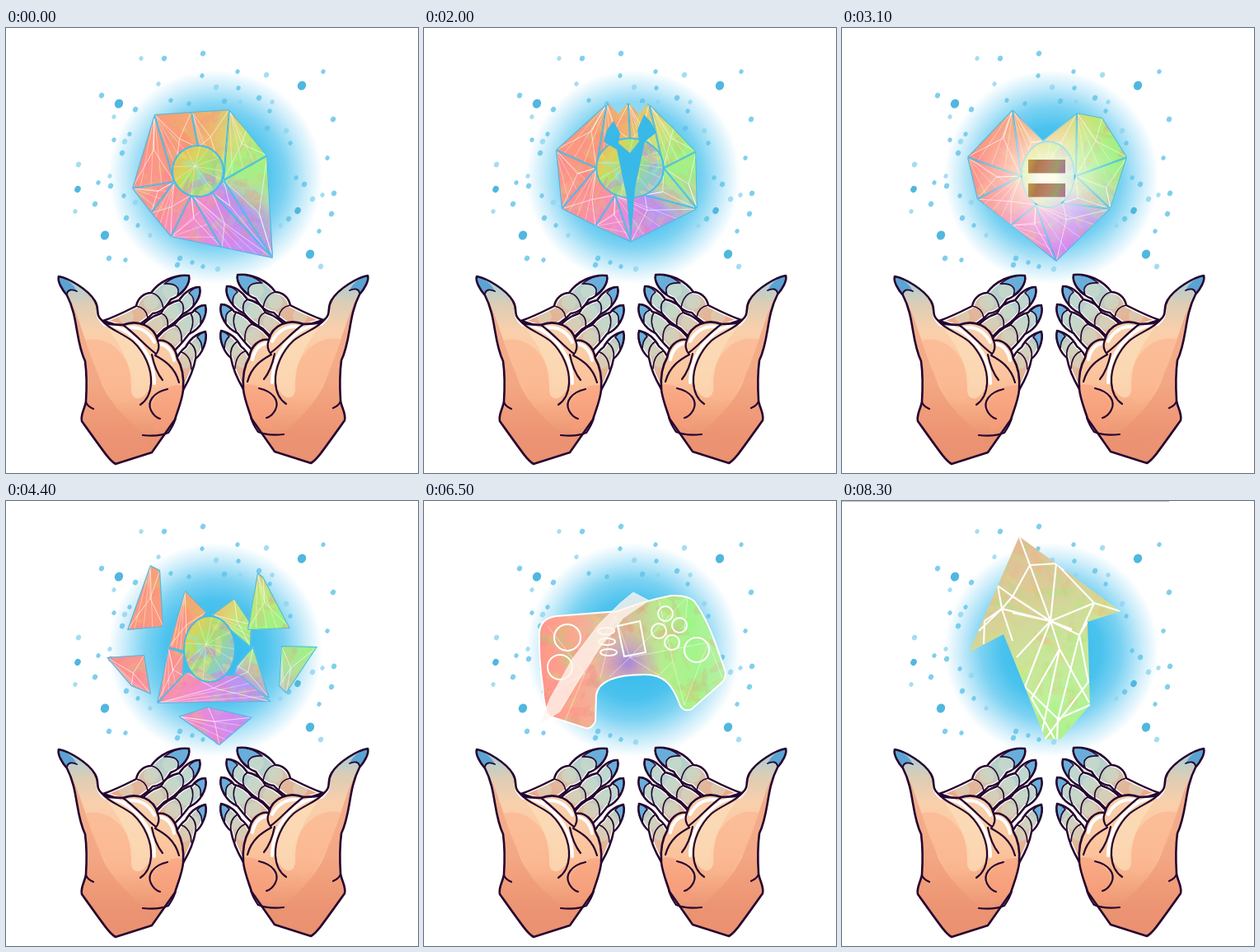
These frames come from a looping animation (500x541 px, 9.4 s). An HTML page with a canvas:

```html
<!DOCTYPE html>
<html lang="en">
<head>
<meta charset="utf-8">
<title>Crystal between two hands</title>
<style>
html, body { margin: 0; width: 100%; height: 100%; overflow: hidden; background: #fff; }
canvas { display: block; width: 500px; height: 541px; }
</style>
</head>
<body>
<canvas id="stage" width="500" height="541"></canvas>
<script>
const W = 500, H = 541, LOOP = 9400, INK = '#26042f', BLUE = '#42bde9';
const ctx = document.getElementById('stage').getContext('2d');
const nums = text => text.trim().split(/\s+/).map(Number);
const pairs = text => {
  const n = nums(text), out = [];
  for (let i = 0; i < n.length; i += 2) out.push([n[i], n[i + 1]]);
  return out;
};
const mix = (a, b, p) => a + (b - a) * p;
const clamp = v => Math.max(0, Math.min(1, v));
const mixPts = (a, b, p) => a.map((v, i) => [mix(v[0], b[i][0], p), mix(v[1], b[i][1], p)]);

let seed = 7;
const rnd = () => (seed = seed * 16807 % 2147483647) / 2147483647;

function layer(draw) {
  const c = document.createElement('canvas');
  c.width = W; c.height = H;
  draw(c.getContext('2d'));
  return c;
}
function stops(grad, colors) {
  colors.forEach((c, i) => grad.addColorStop(i / (colors.length - 1), c));
  return grad;
}
const linear = (g, x0, y0, x1, y1, colors) => stops(g.createLinearGradient(x0, y0, x1, y1), colors);
function poly(pts) {
  const p = new Path2D();
  pts.forEach(v => p.lineTo(...v));
  p.closePath();
  return p;
}

// ---- static scene: glow, dots, hands ----
const dots = pairs(`164 37 239 31 281 53 316 57 385 53 116 82 185 68 192 37 238 58 255 72
  282 73 307 85 323 90 397 111 390 158 88 166 112 188 108 214 84 223 125 280 145 282 382 290
  380 247 398 201 384 203 395 226 239 290 257 293 226 285 208 288 131 108 157 99 150 129 144 138
  131 136 141 152 126 180 127 192 143 204 157 212 160 240 146 231 175 252 211 280 200 88 208 103
  222 92 265 89 284 90 317 122 320 101 340 125 345 140 343 232 333 240 362 190 352 182 372 208`);
const bigDots = pairs('137 92 359 70 120 252 369 275 354 222 87 196');

const fingers = [
  ['M118 356C135 350 150 342 158 338C160 328 168 322 176 322C186 308 205 299 222 301C224 310 216 324 200 330C194 340 188 346 178 347C170 356 160 362 150 366Z',
   'M192 311C203 302 214 300 222 301C224 308 218 318 208 325C212 315 205 310 192 311Z', 'M158 338Q170 340 172 352M176 322Q188 324 191 341'],
  ['M158 370C168 356 178 350 188 347C192 338 200 333 210 331C216 322 226 314 235 315C238 326 228 342 214 348C208 356 200 362 192 366L178 380Z',
   'M222 322C227 316 232 315 235 315C237 323 234 331 227 338C229 330 227 326 222 322Z', 'M188 347Q198 350 196 364M210 331Q218 336 214 348'],
  ['M178 384C186 372 194 364 204 361C210 352 220 347 226 346C230 340 236 337 242 337C245 350 236 366 222 372C216 380 210 388 200 396Z',
   'M229 344C235 337 240 337 242 337C244 344 242 352 236 359C237 350 235 346 229 344Z', 'M204 361Q214 364 213 382M224 347Q230 356 223 371'],
  ['M204 408C208 398 212 392 218 388C222 380 230 372 242 369C245 380 238 396 230 402C228 414 222 428 215 440L204 430Z',
   'M232 376C236 371 240 369 242 369C244 376 242 384 238 392C238 384 236 379 232 376Z', 'M213 394Q224 398 225 415M222 382Q232 388 230 402']
];
const pads = pairs('146 351 176 334 199 320 182 359 202 345 220 331 202 376 218 361 231 351 216 405 226 391');
const palm = 'M64 302C76 304 100 318 108 332C114 342 108 348 116 355C122 362 130 360 142 361C160 354 180 362 184 380C196 378 206 388 208 402C214 412 216 426 215 440C214 452 208 466 205 476L177 516L133 530C126 526 122 520 92 478C90 470 96 462 97 454C98 438 98 420 96 405C84 380 88 352 74 325C68 318 62 308 64 302Z';

function hand(g) {
  const fill = (d, c) => { g.fillStyle = c; g.fill(new Path2D(d)); };
  const line = (d, c = INK, w = 2.2) => { g.strokeStyle = c; g.lineWidth = w; g.stroke(new Path2D(d)); };
  g.lineCap = g.lineJoin = 'round';
  for (const [shape, nail, joints] of fingers) {
    fill(shape, linear(g, 225, 320, 150, 385, ['#a5cfdb', '#b9d0c8', '#e3b699', '#f0a685']));
    g.save();
    g.clip(new Path2D(shape));
    g.fillStyle = '#d3dfc980';
    pads.forEach(([x, y]) => { g.beginPath(); g.arc(x, y, 9, 0, 7); g.fill(); });
    line(shape, '#fff', 5);
    g.restore();
    line(joints, INK, 1.6);
    fill(nail, '#69aeda');
    line(nail, INK, 1.6);
    line(shape, INK, 2.5);
  }
  fill(palm, linear(g, 150, 303, 150, 530, ['#9fcfe0', '#dccdb5', '#f9cfac', '#fbcba4', '#fbc19a', '#f5a982', '#ea9472', '#e68f6d']));
  g.save();
  g.clip(new Path2D(palm));
  fill('M74 325C88 345 96 385 112 420C120 450 140 470 168 494L180 520L130 535L85 478L97 440Z', '#ee937390');
  fill('M96 380C126 372 150 400 156 430C158 460 138 462 122 440C108 420 104 400 96 380Z', '#fcb58ea0');
  fill('M124 366C156 370 178 400 175 436C164 458 150 452 152 436C152 408 140 388 124 366Z', '#fde0bbb0');
  fill('M178 455C186 440 204 430 216 436L205 478L180 490Z', '#fa9c7b90');
  line('M112 343Q110 352 120 361C150 362 180 394 180 432M144 365Q168 360 180 382M186 384Q200 386 204 404', '#fff', 4);
  g.restore();
  line('M116 355C124 366 140 370 154 381C168 394 177 414 176 432Q175 450 163 458M142 361C160 374 170 388 182 396M184 380Q188 390 181 398C192 404 205 412 210 431M177 397Q181 417 190 428M196 439C178 443 171 455 176 465Q180 473 187 475M166 495Q186 497 197 492Q204 482 206 474M97 455Q99 460 106 463');
  fill('M64 302C70 303 82 310 86 320C80 318 76 318 74 323C67 314 62 306 64 302Z', '#5ba3d2');
  line('M86 320C80 317 75 318 74 323', INK, 1.8);
  line(palm, INK, 2.6);
}

const scene = layer(g => {
  g.fillStyle = '#fff';
  g.fillRect(0, 0, W, H);
  const glow = g.createRadialGradient(254, 181, 30, 254, 181, 130);
  [[0, '#3bbdec'], [.3, '#4ac2ee'], [.55, '#7bd2f2'], [.8, '#c9ecfa'], [1, '#ffffff']].forEach(s => glow.addColorStop(...s));
  g.fillStyle = glow;
  g.fillRect(120, 48, 268, 268);
  const dot = (x, y, r) => { g.beginPath(); g.ellipse(x, y, r, r * 1.15, .5, 0, 7); g.fill(); };
  dots.forEach(([x, y], i) => { g.fillStyle = i % 3 ? '#5fc3e8cc' : '#8ed4efcc'; dot(x, y, 2.5 + i % 2 * .5); });
  g.fillStyle = '#50b7de';
  bigDots.forEach(([x, y], i) => dot(x, y, i < 4 ? 5 : 3.6));
  hand(g);
  g.setTransform(-1, 0, 0, 1, 503, -1);
  hand(g);
});

// ---- holographic textures ----
function texture(makeBase, hues, strength) {
  return ctx.createPattern(layer(g => {
    g.fillStyle = makeBase(g);
    g.fillRect(0, 0, W, H);
    for (let i = 0; i < 500; i++) {
      const x = 120 + rnd() * 270, y = 40 + rnd() * 265, hue = hues[i % hues.length];
      g.fillStyle = `hsla(${hue},90%,70%,${strength})`;
      g.beginPath();
      g.ellipse(x, y, 3 + rnd() * 12, 2 + rnd() * 4, rnd() * 6, 0, 7);
      g.fill();
    }
  }), 'no-repeat');
}
const rainbow = texture(g => {
  const c = g.createConicGradient(0, 250, 180);
  [[0, '#a0f08c'], [.07, '#b5d8b0'], [.13, '#b596f5'], [.22, '#d48bf0'], [.3, '#f08cd0'], [.38, '#fb90a8'],
   [.5, '#fd9488'], [.62, '#fa9a7c'], [.74, '#efb36d'], [.84, '#d2df78'], [.92, '#a6f080'], [1, '#a0f08c']].forEach(s => c.addColorStop(...s));
  return c;
}, [10, 45, 95, 330, 20], .13);
const orbFill = texture(g => linear(g, 205, 145, 285, 205, ['#f0ae68', '#d9d45c', '#a9d87c', '#8ccfc0', '#c9a3d8']), [55, 180, 100, 30, 290], .3);
const padFill = texture(g => linear(g, 140, 190, 366, 175, ['#ff958c', '#fca58f', '#edb79f', '#d5c19c', '#b6ee90', '#a3f58d', '#b9efaa']), [5, 30, 110, 80, 350], .13);
const mintFill = texture(g => linear(g, 255, 280, 365, 150, ['#d5e98c', '#a6f4df', '#a8f3f3']), [170, 185, 150, 90], .22);
const arrowFill = texture(g => linear(g, 180, 60, 280, 290, ['#e2bd9b', '#dacb98', '#cee09a', '#bdf09b', '#a8f58e']), [40, 80, 110, 25], .14);

// ---- faceted shapes: ten quads sharing fifteen vertices ----
const facets = ['0 0 10 9', '9 10 10 8', '10 12 7 8', '0 1 14 10', '1 2 11 14', '2 3 4 11', '11 4 5 5', '11 5 13 13', '12 13 5 6', '7 12 12 6'].map(nums);
const shape = (text, orb) => {
  const v = pairs(text);
  return { quads: facets.map(f => f.map(i => v[i])), orb };
};
const gem = shape('180 105 225 102 271 99 292 124 317 155 324 280 262 267 200 254 176 225 153 195 204 187 264 185 225 203 250 200 233 145', [233, 174, 31, 31]);
const hex = shape('222 92 248 91 273 92 303 122 330 150 332 220 251 260 208 241 167 220 160 148 209 170 291 170 232 203 268 203 250 136', [250, 170, 41, 36]);
const heart = shape('207 99 244 137 285 103 316 109 346 157 326 220 260 284 205 240 164 208 152 157 217 180 284 180 235 215 268 213 250 139', [250, 178, 32, 40]);
const burst = {
  quads: ['175 78 187 84 191 153 147 157', '122 190 168 187 176 235 152 225', '197 178 216 185 215 212 183 246',
    '217 108 243 135 218 183 197 178', '250 138 277 118 298 150 297 178', '305 87 312 92 345 155 293 157',
    '334 176 378 177 340 234 331 225', '300 177 320 240 275 215 280 200', '209 262 245 250 299 263 259 297',
    '183 246 218 208 285 212 322 244'].map(pairs),
  orb: [247, 180, 31, 40]
};
const fused = { quads: burst.quads.map(q => q.map(([x, y]) => [mix(250, x, .7), mix(185, y, .5)])), orb: [250, 185, 25, 28] };
const morph = (a, b, p) => ({
  quads: a.quads.map((q, i) => mixPts(q, b.quads[i], p)),
  orb: a.orb.map((v, i) => mix(v, b.orb[i], p))
});

function clipped(path, draw) {
  ctx.save();
  ctx.clip(path);
  draw();
  ctx.restore();
}
function stroke(path, color, width) {
  ctx.strokeStyle = color;
  ctx.lineWidth = width;
  ctx.stroke(path);
}
function rays(from, targets) {
  const p = new Path2D();
  targets.forEach(v => { p.moveTo(...from); p.lineTo(...v); });
  return p;
}
function drawCrystal({ quads, orb }) {
  for (const q of quads) {
    const path = poly(q), [a, b, c, d] = q;
    ctx.fillStyle = rainbow;
    ctx.fill(path);
    clipped(path, () => {
      const hub = [0, 1].map(k => (a[k] + b[k] + c[k] + d[k]) / 4);
      stroke(rays(hub, q), '#ffffffb0', .9);
      stroke(rays(a, [.3, .55, .8].map(p => mixPts([c], [d], p)[0])), '#ffffff90', .7);
      stroke(path, BLUE, 2.2);
    });
  }
  const [x, y, rx, ry] = orb, ball = new Path2D();
  ball.ellipse(x, y, rx, ry, 0, 0, 7);
  ctx.fillStyle = orbFill;
  ctx.fill(ball);
  clipped(ball, () => {
    const rim = Array.from({ length: 11 }, (_, i) => [x + rx * Math.cos(i * 2.4), y + ry * Math.sin(i * 2.4)]);
    stroke(rays([x - 4, y - 6], rim), '#ffffff80', .7);
  });
  stroke(ball, BLUE, 2);
}

const spike = new Path2D('M218 138L222 124L230 113L238 128L236 140L250 152L261 138L259 124L267 105L275 114L282 127L268 138L256 195L251 260L246 205L234 148Z');
const teeth = new Path2D('M223 91L236 105L247 91ZM249 91L261 105L272 91Z');

function drawEquals(alpha) {
  ctx.globalAlpha = alpha;
  const g = ctx.createRadialGradient(249, 182, 8, 249, 182, 90);
  stops(g, ['#fffef0f5', '#fffde8a0', '#ffffff40', '#ffffff00']);
  ctx.fillStyle = g;
  clipped(heartOutline, () => ctx.fillRect(140, 90, 220, 200));
  for (const y of [160, 189]) {
    ctx.fillStyle = linear(ctx, 226, y, 271, y + 16, ['#bd9e45', '#b0784f', '#b98268', '#9c9b6d', '#b36ba0']);
    ctx.fillRect(226, y, 45, 16.5);
  }
  ctx.globalAlpha = 1;
}
const heartOutline = new Path2D();
heart.quads.forEach(q => heartOutline.addPath(poly(q)));
heartOutline.ellipse(250, 178, 32, 40, 0, 0, 7);

// ---- game controller ----
const padBody = new Path2D('M140 160Q141 143 160 140L235 134Q265 122 300 115Q320 114 328 122C346 146 356 180 366 208Q367 215 361 221L325 253Q316 257 311 249C302 224 292 211 268 211C238 211 212 217 209 236L208 268Q203 278 196 276L153 262Q146 256 144 225Q139 190 140 160Z');
const buttons = new Path2D('M235 152L262 146L269 184L243 189Z');
['174 166 16 16', '165 202 15 15', '293 137 9 9', '285 158 9 9', '310 151 9 9', '301 172 9 9', '331 181 15 15', '221 158 10 4', '222 171 10 4', '224 184 10 4'].forEach(s => {
  const [x, y, rx, ry] = nums(s);
  buttons.moveTo(x + rx, y);
  buttons.ellipse(x, y, rx, ry, 0, 0, 7);
});
const padCracks = new Path2D('M150 152L195 210L170 270M195 210L160 230M195 210L232 140L214 215M250 190L232 140M250 190L225 214M250 190L285 212M250 190L320 116M250 190L345 172M320 116L316 158M345 172L316 248M345 172L362 215M285 120L302 195L316 248M302 195L285 212');
function drawController(body, lines) {
  ctx.globalAlpha = body;
  ctx.fillStyle = padFill;
  ctx.fill(padBody);
  clipped(padBody, () => {
    const g = ctx.createRadialGradient(247, 196, 4, 247, 196, 38);
    ctx.fillStyle = stops(g, ['#a884dce0', '#c79ac890', '#c79ac800']);
    ctx.fillRect(200, 150, 95, 80);
    stroke(padCracks, '#ffffff85', .9);
  });
  ctx.globalAlpha = lines;
  stroke(padBody, '#fff', 2);
  stroke(buttons, '#fff', 2);
  ctx.globalAlpha = 1;
}

const band = new Path2D('M273 121L254 111L238 124L212 150L180 192L153 240L141 271L165 256L184 224L212 180L242 142Z');
function drawGlint(p) {
  ctx.save();
  ctx.beginPath();
  ctx.rect(139, 101, 229, 177);
  ctx.clip();
  ctx.translate((p - .4) * 310, 0);
  ctx.fillStyle = '#fff5efc8';
  ctx.fill(band);
  stroke(band, '#ffffffa0', 1);
  ctx.restore();
}

const swishes = new Path2D('M342 128Q352 122 356 136L355 151Q322 164 300 193L272 242L258 235L282 200Q306 155 342 128ZM302 236Q306 210 340 198Q362 182 368 198Q367 224 345 245Q312 278 280 292L258 288L249 270L258 265Q270 276 285 264Q302 256 308 246Z');
function drawSwishes(k) {
  ctx.save();
  ctx.globalAlpha = k < .6 ? k / .6 : clamp((1 - k) / .4);
  ctx.translate((k - .6) * 110, (.6 - k) * 40);
  ctx.fillStyle = mintFill;
  ctx.fill(swishes);
  clipped(swishes, () => stroke(rays([310, 236], pairs('345 190 365 205 350 240 320 270 275 292 340 130 300 190 265 240')), '#ffffffb0', 1));
  ctx.restore();
}

// ---- arrow ----
const arrow = poly(pairs('215 43 338 134 298 147 301 248 266 289 247 290 221 224 196 162 154 184 189 103'));
const arrowLines = new Path2D('M215 43L228 78L260 76M189 103L207 116L228 78L253 146L260 76L270 84M253 146L207 116L194 131L207 170M189 103L194 131L166 158M253 146L194 131L173 146L172 174M253 146L207 136M253 146L306 124L260 76M253 146L288 163L306 124L338 134M253 146L279 156M253 146L212 190M253 146L222 226M253 146L264 180L242 284M264 180L300 245M264 180L230 240L258 289M288 163L298 147M288 163L262 265L301 248M288 163L299 220L246 290M222 226L262 265L261 289');
function drawArrow(a) {
  ctx.save();
  ctx.globalAlpha = a;
  ctx.translate(0, (1 - a) * 45);
  ctx.fillStyle = arrowFill;
  ctx.fill(arrow);
  clipped(arrow, () => stroke(arrowLines, '#fff', 2.1));
  ctx.restore();
}

// ---- timeline, advancing in steps of 100 ms ----
function render(t) {
  const ramp = (start, steps) => clamp(((t - start) / 100 + 1) / steps);
  ctx.drawImage(scene, 0, 0);
  if (t < 5000) {
    const toHex = ramp(1000, 7), toHeart = ramp(2000, 8), out = ramp(4100, 4), fuse = ramp(4500, 6);
    let s = morph(gem, hex, toHex);
    if (t >= 2000) s = morph(hex, heart, toHeart * toHeart);
    if (t >= 4100) s = morph(heart, burst, out);
    if (t >= 4500) s = morph(burst, fused, fuse);
    ctx.globalAlpha = 1 - fuse * .8;
    drawCrystal(s);
    ctx.globalAlpha = 1;
    if (t >= 2000 && t < 2600) {
      ctx.globalAlpha = 1 - (t - 2000) / 600;
      ctx.fillStyle = '#8fd8f3';
      ctx.fill(teeth);
      ctx.fillStyle = '#39b9e8';
      ctx.fill(spike);
      ctx.globalAlpha = 1;
    }
    if (t >= 2900) drawEquals(ramp(2900, 3) * (1 - ramp(4100, 3)));
    if (t >= 4500) drawController(fuse * .9, 0);
  } else if (t < 8200) {
    const fade = t < 7200 ? 0 : ramp(7200, 10);
    drawController(clamp(1 - fade * 1.8), ramp(5000, 3) * (fade ? clamp(.8 - fade) : 1));
    if (t >= 6200 && t < 7100) drawGlint(ramp(6200, 10));
    if (fade) drawSwishes(fade);
  }
  if (t >= 7800) drawArrow(ramp(7800, 6));
  if (t >= 8200) {
    ctx.fillStyle = '#b9bec4';
    ctx.fillRect(0, 0, 397, 1);
  }
}
function tick() {
  render(Math.floor(performance.now() % LOOP / 100) * 100);
  requestAnimationFrame(tick);
}
tick();
</script>
</body>
</html>
```
